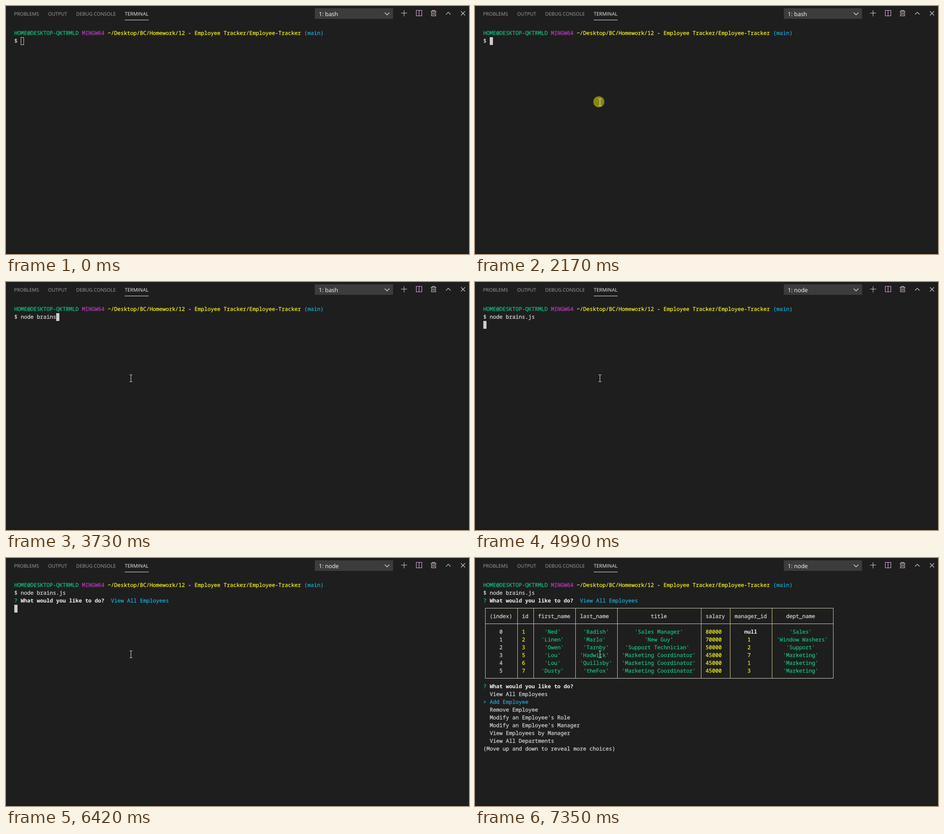
An HTML page for the animation above (8000 ms loop, 1006 by 541 pixels).

```html
<!DOCTYPE html>
<html lang="en">
<head>
<meta charset="utf-8">
<title>Terminal</title>
<style>
html, body { margin: 0; width: 100%; height: 100%; overflow: hidden; background: #1e1e1e; }
svg { display: block; width: 100%; height: 100%; }
text { white-space: pre; text-rendering: geometricPrecision; }
.ui { font-family: "Open Sans", "Noto Sans", sans-serif; }
.tab { font-size: 10.5px; fill: #a2a2a2; }
.term { font: 11.667px "Noto Sans Mono", monospace; stroke-width: .25; }
.icon { fill: none; stroke: #d0d0d0; stroke-width: 1.1; }
</style>
</head>
<body>
<svg viewBox="0 0 1006 541">
  <rect width="1006" height="541" fill="#1e1e1e"/>
  <rect y="537" width="1006" height="4" fill="#1a1b1c"/>
  <g class="ui tab">
    <text x="17.5" y="21">PROBLEMS</text>
    <text x="91.5" y="21">OUTPUT</text>
    <text x="152.5" y="21">DEBUG CONSOLE</text>
    <text x="258" y="21" fill="#f0f0f0" style="font-size:10.7px">TERMINAL</text>
  </g>
  <rect x="258" y="30" width="52" height="1" fill="#e7e7e7"/>
  <rect x="671" y="5" width="170" height="23" fill="#3c3c3c"/>
  <text class="ui" id="shell" x="679.5" y="22" font-size="12.5" fill="#ffffff"></text>
  <g class="icon">
    <path d="M823 14.5l5 5 5-5" stroke="#f0f0f0"/>
    <path d="M956 18.5l5-5 5 5M988.5 11.5l9 9m0-9l-9 9"/>
    <path d="M865 9.5v13M858.500 15.500h13"/>
    <path d="M891.500 9.500h12v12h-12zM897.500 9.500v12" stroke="#e4a8e8"/>
    <path d="M923 11.500h12M926.500 11.500v-2h5v2M924.500 11.500v10h9v-10M927.500 13.500v6M930.500 13.500v6" stroke="#e2c8d0"/>
  </g>
  <g class="term" id="screen"></g>
  <circle id="click" cx="269" cy="209" r="12" fill="#89870f"/>
  <path id="pointer" d="M-3-7.500h2.500l.5.500.5-.500h2.500M0-7v14M-3 7.500h2.500l.5-.500.5.500h2.500" fill="none" stroke="#e8e8e8"/>
</svg>
<script>
const LOOP = 8000, CW = 7, LH = 17, LEFT = 18;
const C = {
  text: '#d8d8d8', white: '#f5f5f5', green: '#12c47e', magenta: '#c03cc2',
  yellow: '#f5f51c', blue: '#1cacda', rule: '#cfcdbb', bar: '#d6c68c'
};
const $ = id => document.getElementById(id);
const colX = col => LEFT + col * CW;
const rowTop = row => 51 + row * LH;

const put = (row, col, str, color = C.text, bold = false) =>
  `<text x="${colX(col)}" y="${rowTop(row) + 12}" fill="${color}" ${
    bold ? 'font-weight="700"' : `stroke="${color}"`}>${
    str.replace(/</g, '&lt;').replace(/>/g, '&gt;')}</text>`;

const block = (row, col, hollow) => hollow
  ? `<rect x="${colX(col) + .5}" y="${rowTop(row) + .5}" width="6" height="16" fill="none" stroke="#cccccc" stroke-width="1"/>`
  : `<rect x="${colX(col)}" y="${rowTop(row)}" width="7" height="17" fill="#cccccc"/>`;

const path = (d, color) => `<path d="${d}" fill="none" stroke="${color}" stroke-width="1"/>`;

const HEAD = ['(index)', 'id', 'first_name', 'last_name', 'title', 'salary', 'manager_id', 'dept_name'];
const WIDTHS = [9, 4, 12, 12, 25, 8, 12, 18];
const STAFF = [
  [1, 'Ned', 'Radish', 'Sales Manager', 80000, null, 'Sales'],
  [2, 'Linen', 'Marlo', 'New Guy', 70000, 1, 'Window Washers'],
  [3, 'Owen', 'Tarnby', 'Support Technician', 50000, 2, 'Support'],
  [5, 'Lou', 'Hadwick', 'Marketing Coordinator', 45000, 7, 'Marketing'],
  [6, 'Lou', 'Quillsby', 'Marketing Coordinator', 45000, 1, 'Marketing'],
  [7, 'Dusty', 'theFox', 'Marketing Coordinator', 45000, 3, 'Marketing']
];
const MENU = ['View All Employees', 'Add Employee', 'Remove Employee', "Modify an Employee's Role",
  "Modify an Employee's Manager", 'View Employees by Manager', 'View All Departments'];

function tableRow(row, cells, head) {
  let col = 1;
  return cells.map((v, i) => {
    const plain = head || i === 0;
    const str = !plain && typeof v === 'string' ? `'${v}'` : String(v);
    const color = plain ? C.text : v === null ? C.white : typeof v === 'number' ? C.yellow : C.green;
    const start = col + Math.floor((WIDTHS[i] - str.length) / 2);
    col += WIDTHS[i] + 1;
    return put(row, start, str, color, v === null);
  }).join('');
}

function table(row) {
  const mid = r => rowTop(r) + 7.5;
  const last = row + STAFF.length + 3;
  const left = LEFT + 4.5;
  let x = left, bars = '';
  for (const w of [...WIDTHS, 0]) {
    bars += `M${x} ${mid(row)}V${mid(last)}`;
    x += (w + 1) * CW;
  }
  const right = x - CW;
  const rules = [row, row + 2, last].map(r => `M${left - .5} ${mid(r)}H${right + .5}`).join('');
  return path(bars, C.bar) + path(rules, C.rule) + tableRow(row + 1, HEAD, true) +
    STAFF.map((s, i) => tableRow(row + 3 + i, [i, ...s])).join('');
}

const question = row => put(row, 0, '?', C.green) + put(row, 2, 'What would you like to do?', C.white, true);

function menu(row, active, hint) {
  return question(row) + (hint ? put(row, 30, '(Use arrow keys)') : '') +
    MENU.map((m, i) => i === active
      ? put(row + 1 + i, 0, '> ' + m, C.blue)
      : put(row + 1 + i, 2, m)).join('') +
    put(row + 8, 0, '(Move up and down to reveal more choices)');
}

const PROMPT = put(0, 0, 'HOME@DESKTOP-QKTRMLD', C.green) + put(0, 21, 'MINGW64', C.magenta) +
  put(0, 29, '~/Desktop/BC/Homework/12 - Employee Tracker/Employee-Tracker', C.yellow) +
  put(0, 90, '(main)', C.blue) + put(1, 0, '$');
const COMMAND = 'node brains.js';

// Key presses come in bursts: first time, last time, number of keys
const BURSTS = [[2790, 2960, 3], [3110, 3580, 7], [3730, 3730, 1], [4130, 4290, 3]];
const KEYS = BURSTS.flatMap(([a, b, n]) =>
  Array.from({ length: n }, (_, i) => n > 1 ? a + (b - a) * i / (n - 1) : a));

function screen(t) {
  const typed = KEYS.filter(k => k <= t + .01).length;
  let out = PROMPT + put(1, 2, COMMAND.slice(0, typed));
  if (t < 4920) return out + block(1, 2 + typed, t < 2170);
  if (t < 5390) return out + block(2, 0);
  if (t < 6420) return out + menu(2, 0, true);
  out += question(2) + put(2, 30, MENU[0], C.blue);
  if (t < 6500) return out + block(3, 0);
  out += table(3);
  if (t < 7270) return out + menu(13, 0, true);
  return t < 7350 ? out : out + menu(13, 1, false);
}

function pointerAt(t) {
  if (t < 70) return null;
  if (t < 150) return [538.5, 366];
  if (t < 230) return [350.5, 256];
  return [271.5, 210];
}

let shown = '';
function draw(t) {
  const next = screen(t);
  if (next !== shown) $('screen').innerHTML = shown = next;
  $('shell').textContent = t < 4990 ? '1: bash' : '1: node';
  $('click').setAttribute('visibility', t >= 2170 && t < 2240 ? 'visible' : 'hidden');
  const p = pointerAt(t);
  $('pointer').setAttribute('visibility', p ? 'visible' : 'hidden');
  if (p) $('pointer').setAttribute('transform', `translate(${p})`);
}

const start = performance.now();
function tick() {
  draw((performance.now() - start) % LOOP);
  requestAnimationFrame(tick);
}
tick();
</script>
</body>
</html>
```
